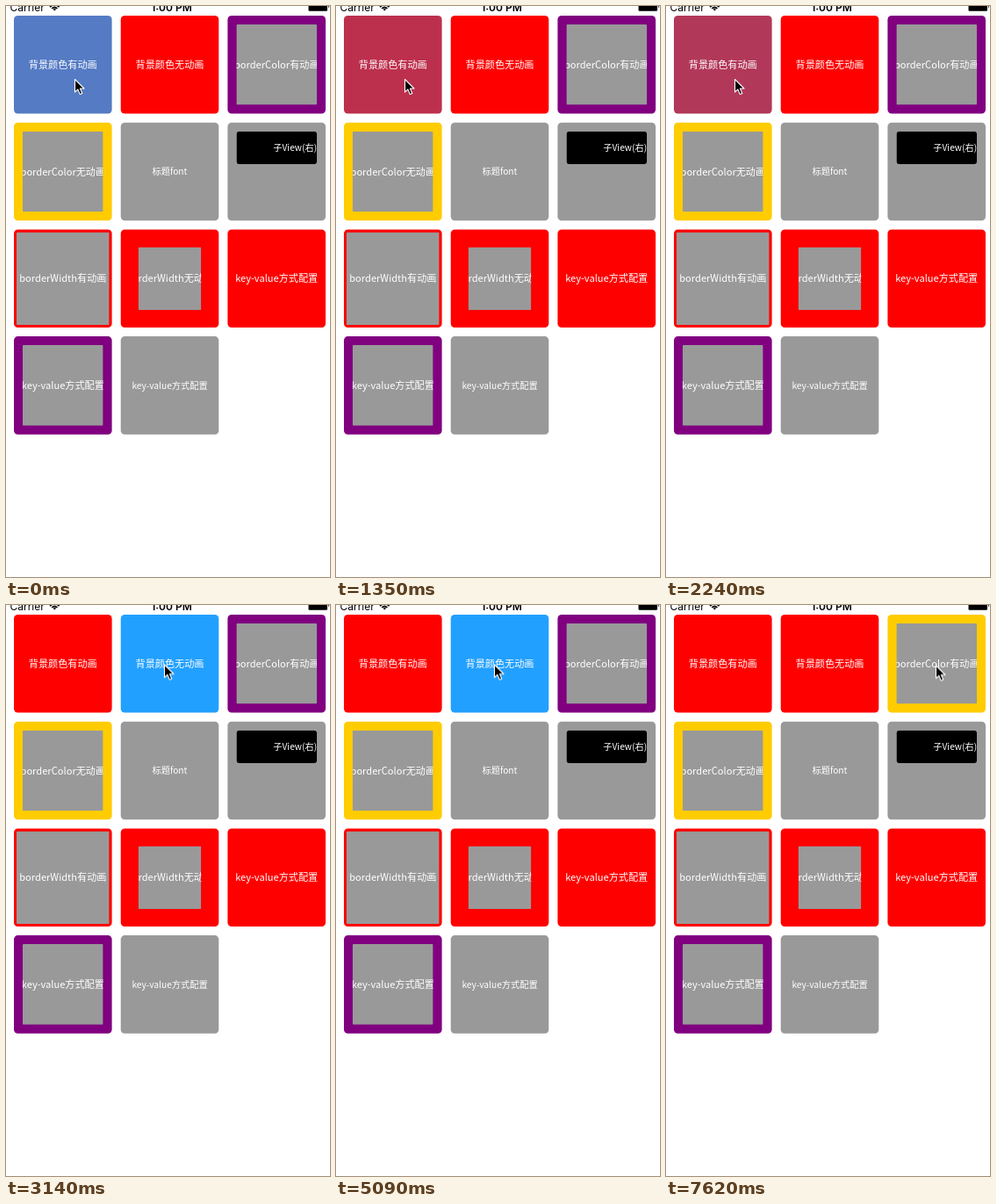
Animation, 369 px wide and 650 px high, one loop 8 s. Source, as an HTML page:

```html
<!DOCTYPE html>
<html lang="zh-CN">
<head>
<meta charset="utf-8">
<title>Tile grid</title>
<style>
html, body { margin: 0; width: 100%; height: 100%; overflow: hidden; background: #fff; }
svg { display: block; }
text { font-family: "Noto Sans CJK SC", "Noto Sans CJK", sans-serif; fill: #fff; }
.status text { font: 12px Inter, sans-serif; fill: #000; }
.status .clock { font-weight: 600; }
</style>
</head>
<body>
<svg id="stage" width="369" height="650" viewBox="0 0 369 650">
  <g class="status">
    <text x="4.5" y="5.5">Carrier</text>
    <g fill="none" stroke="#000" stroke-width="1.7">
      <path d="M50 1.2Q55.3 -4 60.6 1.2"/>
      <path d="M52.2 3Q55.3 0 58.4 3"/>
    </g>
    <path d="M53.5 3.7Q55.3 2.2 57.1 3.7L55.3 5.5Z"/>
    <text class="clock" x="188.5" y="5.5" text-anchor="middle">1:00 PM</text>
    <rect x="344.5" y="-4" width="21.5" height="9.8" rx="1.2"/>
    <path d="M367 -1.2Q368.6 .6 367 2.6Z"/>
  </g>
  <g id="tiles"></g>
  <path id="cursor" d="M.5 .5V15L3.9 11.9L6.3 17.6L8.8 16.5L6.4 11H11Z"
    stroke="#fff" stroke-width="1.1" stroke-linejoin="round"/>
</svg>
<script>
const LOOP = 8000;
const RED = '#ff0000', BLUE = '#22a0ff', GRAY = '#999999', PURPLE = '#800080', YELLOW = '#ffcc00';
const SIZE = 111.6, PITCH = 121.7, BIG = 11.14, SMALL = 10.2;

const grid = document.getElementById('tiles');

function add(parent, tag, attrs, text) {
  const el = document.createElementNS('http://www.w3.org/2000/svg', tag);
  for (const key in attrs) el.setAttribute(key, attrs[key]);
  if (text) el.textContent = text;
  parent.append(el);
  return el;
}

function label(parent, x, y, size, anchor, text) {
  add(parent, 'text', { x, y: y + size * 0.37, 'font-size': size, 'text-anchor': anchor }, text);
}

// Each tile: label, font size, outer colour, border width
const tiles = [
  ['背景颜色有动画', BIG, RED, 0],
  ['背景颜色无动画', BIG, RED, 0],
  ['borderColor有动画', BIG, PURPLE, 10],
  ['borderColor无动画', BIG, YELLOW, 10],
  ['标题font', SMALL, GRAY, 0],
  ['', SMALL, GRAY, 0],
  ['borderWidth有动画', BIG, RED, 3],
  ['borderWidth无动画', BIG, RED, 20],
  ['key-value方式配置', BIG, RED, 0],
  ['key-value方式配置', BIG, PURPLE, 10],
  ['key-value方式配置', SMALL, GRAY, 0]
].map(([text, size, color, border], i) => {
  const x = 9 + (i % 3) * PITCH, y = 11 + Math.floor(i / 3) * PITCH;
  const inner = SIZE - 2 * border;
  const box = add(grid, 'rect', { x, y, width: SIZE, height: SIZE, rx: 4.5, fill: color });
  const view = add(grid, 'svg', { x: x + border, y: y + border, width: inner, height: inner, overflow: 'hidden' });
  if (border) add(view, 'rect', { width: inner, height: inner, rx: 1, fill: GRAY });
  if (text) label(view, inner / 2, inner / 2, size, 'middle', text);
  return box;
});

const sub = add(grid, 'svg', { x: 262.5, y: 142.8, width: 91.6, height: 37.2 });
add(sub, 'rect', { width: 91.6, height: 37.2, rx: 3.5 });
label(sub, 91.6, 18.5, SMALL, 'end', '子View(右)');

function mix(a, b, t) {
  const part = (c, i) => parseInt(c.slice(i, i + 2), 16);
  return `rgb(${[1, 3, 5].map(i => Math.round(part(a, i) * (1 - t) + part(b, i) * t)).join()})`;
}

// Holds each [ms, value] until the next step
function play(el, prop, steps) {
  const frames = steps.map(([ms, value]) => ({ offset: ms / LOOP, [prop]: value, easing: 'steps(1, end)' }));
  frames.push({ offset: 1, [prop]: steps[steps.length - 1][1] });
  el.animate(frames, { duration: LOOP, iterations: Infinity });
}

const redness = t => mix(BLUE, RED, t);
play(tiles[0], 'fill', [
  [0, 0.23], [150, 0.87], [300, 1], [1350, 0.7], [1490, 0.1], [1640, 0],
  [2090, 0.08], [2240, 0.65], [2390, 1]
].map(([ms, t]) => [ms, redness(t)]));

play(tiles[1], 'fill', [[0, RED], [3140, BLUE], [4340, RED], [5090, BLUE], [5990, RED]]);

play(tiles[2], 'fill', [[0, PURPLE], [7470, mix(PURPLE, YELLOW, 0.5)], [7620, YELLOW]]);

play(document.getElementById('cursor'), 'transform', [
  [0, 78, 83], [2390, 81, 83], [2540, 164, 68], [2690, 180, 67.5],
  [6430, 283, 73], [6580, 290, 73], [6730, 301, 71], [6880, 307, 68.5]
].map(([ms, x, y]) => [ms, `translate(${x}px, ${y}px)`]));
</script>
</body>
</html>
```
